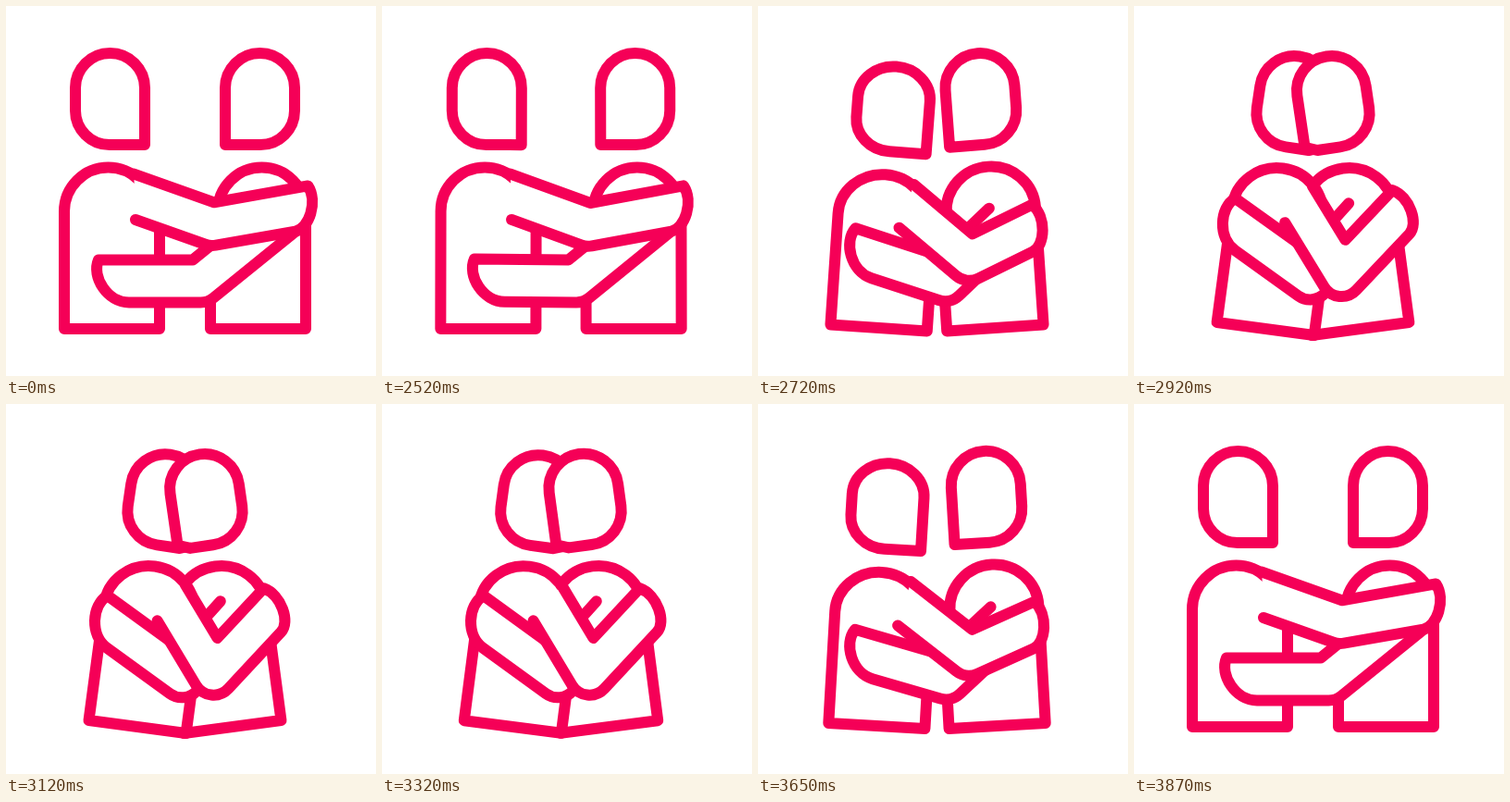
Recreate the animation shown at these times as an HTML page with a canvas. Size 400 by 400 pixels, loop 3900 ms.

```html
<!DOCTYPE html>
<html lang="en">
<head>
<meta charset="utf-8">
<title>Hug</title>
<style>
  html, body { margin: 0; height: 100%; overflow: hidden; background: #fff; }
  canvas { display: block; width: 100%; height: 100%; }
</style>
</head>
<body>
<canvas width="400" height="400"></canvas>
<script>
const LOOP = 3900;
const SPAN = 387;      // x of a mirrored point is SPAN - x
const ARM = 23;        // half the width of an arm
const ctx = document.querySelector('canvas').getContext('2d');
ctx.fillStyle = '#fff';
ctx.strokeStyle = '#f50057';
ctx.lineWidth = 12;
ctx.lineCap = ctx.lineJoin = 'round';

// Elbow x and y, forearm angle, upper arm angle, forearm length:
// when apart, halfway and hugging. Both arms are posed as left arms.
const leftArm = {
  poses: [[223, 236, -10, 19.5, 109], [228.5, 273.5, -26, 40, 87], [224.5, 291, -47, 59, 104]],
  innerReach: 98, outerReach: 80, slant: 22
};
const rightArm = {
  poses: [[177, 297.5, 0, 39, 110], [185, 296, -18, 43.5, 109], [197, 294, -36, 48, 116]],
  innerReach: 88, outerReach: 115, slant: 33
};

const rad = degrees => degrees * Math.PI / 180;
const clamp = x => Math.min(1, Math.max(0, x));
const ease = (t, from, to) => {
  const x = clamp((t - from) / (to - from));
  return x * x * (3 - 2 * x);
};
const bump = p => (4 * p * (1 - p)) ** 2;
const mix = ([apart, half, close], p) => apart.map((a, i) =>
  a + (close[i] - a) * p + (half[i] - (a + close[i]) / 2) * bump(p));

// Traces a shape in its own space; the line keeps its weight.
function paint(mirrored, trace) {
  ctx.save();
  if (mirrored) ctx.transform(-1, 0, 0, 1, SPAN, 0);
  ctx.beginPath();
  trace();
  ctx.restore();
  ctx.fill();
  ctx.stroke();
}

function place(x, y, degrees, sx, sy) {
  ctx.translate(x, y);
  ctx.rotate(rad(degrees));
  ctx.scale(sx, sy);
}

function torso(p, mirrored) {
  const b = bump(p);
  paint(mirrored, () => {
    place(114.5 + 28 * p + 2 * b, 349 - b, 7.7 * p, 1 + .03 * p, mirrored ? 1 : 1 - .05 * b);
    ctx.moveTo(51.5, -107);
    ctx.lineTo(51.5, 0);
    ctx.lineTo(-51.5, 0);
    ctx.lineTo(-51.5, -127);
    ctx.arc(-4, -127, 47.5, Math.PI, 0);
    ctx.closePath();
  });
}

function head(p, mirrored) {
  const b = bump(p);
  const dip = mirrored ? 0 : b;              // only the left figure ducks
  const tuck = 5 * clamp((p - .72) * 5);     // corners tuck in where heads overlap
  paint(mirrored, () => {
    place(112.5 + 60 * p + 3.5 * b, 100 + 3 * p - 1.5 * b + 11 * dip, 8.5 * p,
      1 + .04 * dip, 1 - .07 * dip);
    ctx.moveTo(37.5, 50 - tuck);
    ctx.lineTo(37.5, -11.5);
    ctx.arc(0, -11.5, 37.5, 0, Math.PI, true);
    ctx.lineTo(-37.5, 13);
    ctx.arc(-.5, 13, 37, Math.PI, Math.PI / 2, true);
    ctx.lineTo(24.5, 50);
    ctx.closePath();
  });
}

// A band bent at the elbow, with a round hand at its end.
function arm({ poses, innerReach, outerReach, slant }, p, mirrored) {
  const [x, y, fore, upper, length] = mix(poses, p);
  const along = degrees => (u, v) => {
    const c = Math.cos(rad(degrees)), s = Math.sin(rad(degrees));
    return [x + u * c - v * s, y + u * s + v * c];
  };
  const onFore = along(fore), onUpper = along(upper);
  const miter = ARM * Math.tan(rad(upper - fore) / 2);

  paint(mirrored, () => {
    ctx.moveTo(...onUpper(-innerReach, -ARM));
    ctx.lineTo(...onFore(miter, -ARM));
    ctx.lineTo(...onFore(length, -ARM));
    ctx.bezierCurveTo(...onFore(length + 8, -ARM * .2),
      ...onFore(length - slant * .3, ARM), ...onFore(length - slant, ARM));
    const end = onUpper(-outerReach, ARM);
    ctx.arcTo(...onFore(-miter, ARM), ...end, 22);
    ctx.lineTo(...end);
  });
}

function draw(t) {
  const hug = ease(t, 2490, 2950) * (1 - ease(t, 3400, 3870));
  const relax = ease(t, 2950, 3420);         // heads drift apart during the hug
  const bodies = hug * (1 - .05 * relax);
  const heads = hug * (1 - .1 * relax);

  ctx.clearRect(0, 0, 400, 400);
  torso(bodies, true);
  torso(bodies, false);
  arm(rightArm, hug, true);
  arm(leftArm, hug, false);
  head(heads, false);
  head(heads, true);
}

const start = performance.now();
function tick() {
  draw((performance.now() - start) % LOOP);
  requestAnimationFrame(tick);
}
tick();
</script>
</body>
</html>
```
